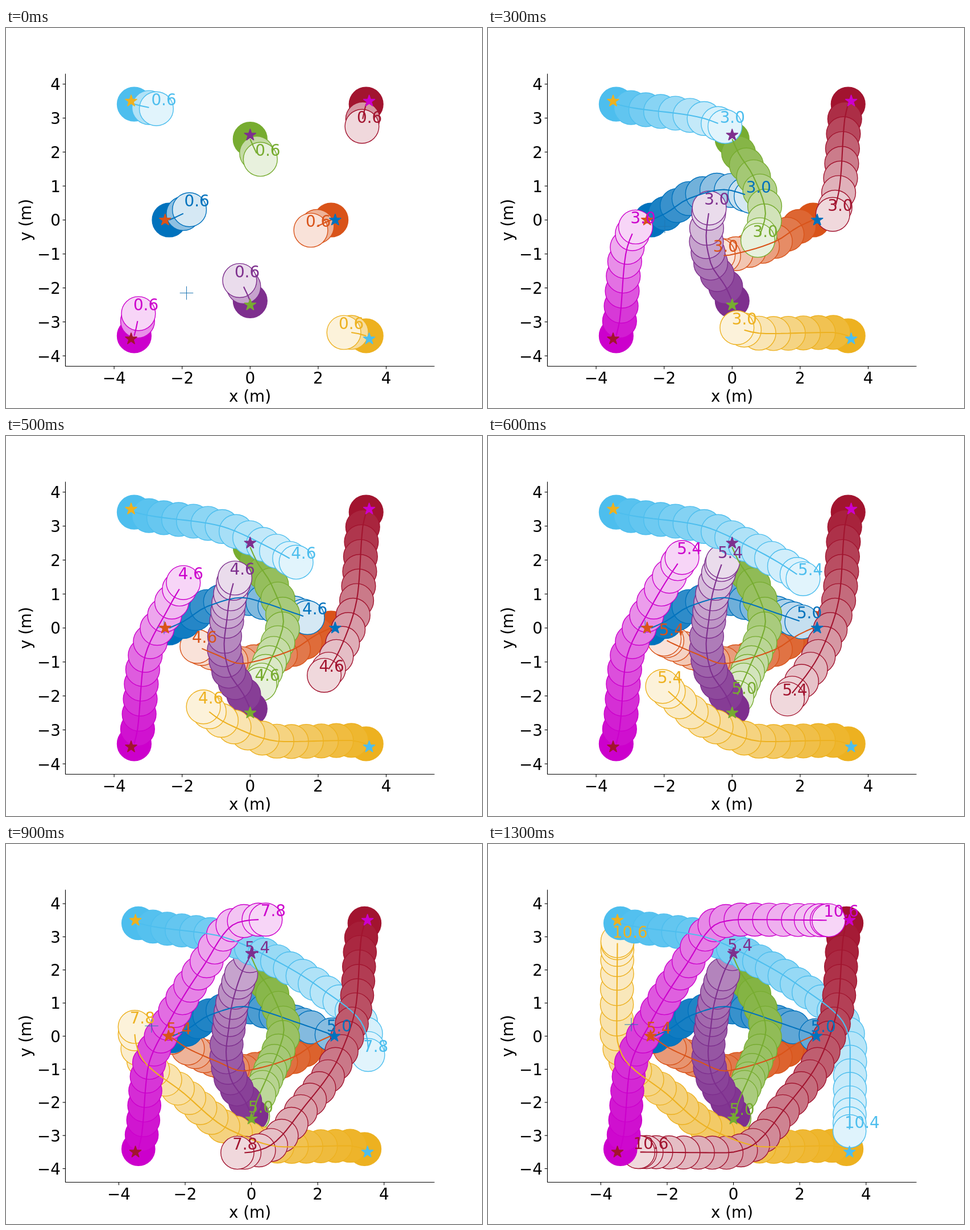
An HTML page with a canvas for the animation above (2300 ms loop, 837 by 669 pixels).

```html
<!DOCTYPE html>
<html>
<head>
<meta charset="utf-8">
<style>
html, body { margin: 0; width: 100%; height: 100%; overflow: hidden; background: #fff; }
canvas { display: block; }
</style>
</head>
<body>
<canvas id="stage" width="837" height="669"></canvas>
<script>
const ctx = document.getElementById('stage').getContext('2d');
const LOOP = 2300, STEP = 100, END = 10.6, RADIUS = 0.5;
const BRAKE = 9.2, REST = 10.05;

// Simulated time that slows evenly as the agents near their goals
function clock(t) {
  const u = Math.max(0, t - BRAKE);
  return t - .28 * u * u;
}

// Monotone cubic curve: flat runs stay flat, without overshoot
function curve(times, values) {
  const last = times.length - 1;
  const slope = i => (values[i + 1] - values[i]) / (times[i + 1] - times[i]);
  const tangent = i => {
    if (i === 0) return slope(0);
    if (i === last) return slope(last - 1);
    const a = slope(i - 1), b = slope(i);
    return a * b > 0 ? 2 * a * b / (a + b) : 0;
  };
  return t => {
    let i = 0;
    while (i < last - 1 && t > times[i + 1]) i++;
    const h = times[i + 1] - times[i];
    const s = Math.min(1, Math.max(0, (t - times[i]) / h)), r = 1 - s;
    return values[i] * (1 + 2 * s) * r * r + values[i + 1] * s * s * (3 - 2 * s)
      + h * s * r * (tangent(i) * r - tangent(i + 1) * s);
  };
}

function path(times, points) {
  const [x, y] = [0, 1].map(axis => curve(times, points.map(p => p[axis])));
  return t => [x(t), y(t)];
}

function turn([x, y], quarters) {
  for (let i = 0; i < quarters; i++) [x, y] = [-y, x];
  return [x, y];
}

// All agents of a ring share start and finish, turned by quarter circles;
// only the middle of the route is their own.
const inner = {
  goal: [2.5, 0],
  times: [0, .4, 1.2, 2.2, 2.8, 3.8, 5.4, 7, REST],
  route: middle => [[-2.38, 0], [-1.965, .19], [-1.27, .63], ...middle, [2.38, .06], [2.48, .03]]
};
const outer = {
  goal: [3.5, -3.5],
  times: [0, .4, 2.2, 3.8, 5.4, 7, 7.6, REST],
  route: middle => [[-3.41, 3.41], [-2.975, 3.31], ...middle, [3.52, middle[3][1] - .63], [3.5, -2.87]]
};

function agent(color, ring, quarters, stop, middle) {
  const route = path(ring.times, ring.route(middle));
  return { color, stop, goal: turn(ring.goal, quarters), at: t => turn(route(clock(t)), quarters) };
}

// Listed from back to front
const agents = [
  agent('#D95319', inner, 2, 5.4, [[-.305, .945], [.25, 1.05], [.99, .785], [2, .325]]),
  agent('#0072BD', inner, 0, 5, [[-.24, .895], [.38, .75], [1.18, .48], [2.05, .18]]),
  agent('#77AC30', inner, 3, 5, [[-.19, .98], [.435, .815], [1.15, .51], [2.04, .135]]),
  agent('#7E2F8E', inner, 1, 5.4, [[-.46, .765], [.2, .69], [.865, .605], [1.96, .275]]),
  agent('#EDB120', outer, 2, 10.6, [[-1, 3.345], [.665, 2.82], [2.045, 1.72], [3.36, .57]]),
  agent('#4DBEEE', outer, 0, 10.4, [[-1.03, 3.04], [.58, 2.36], [2.085, 1.45], [3.39, .27]]),
  agent('#A2142F', outer, 3, 10.6, [[-1.02, 3.165], [.65, 2.63], [2.09, 1.625], [3.38, .42]]),
  agent('#CC00CC', outer, 1, 10.6, [[-1.01, 3.13], [.57, 2.41], [2.075, 1.475], [3.43, .415]])
];

const mark = path([.6, 2.2, 3.8, 5.4, 7, 9.4],
  [[-1.87, -2.15], [-1.49, -.57], [-2.5, 0], [-2.56, .03], [-2.96, .28], [-3.08, .35]]);

let scale, originX, originY;
const px = ([x, y]) => [originX + x * scale, originY - y * scale];

// Blend a hex colour with white
function tint(hex, alpha) {
  const parts = [1, 3, 5].map(i => parseInt(hex.slice(i, i + 2), 16));
  return `rgb(${parts.map(c => Math.round(255 - (255 - c) * alpha))})`;
}

function strokeLine(points, color, width) {
  ctx.strokeStyle = color;
  ctx.lineWidth = width;
  ctx.beginPath();
  points.forEach(p => ctx.lineTo(...p));
  ctx.stroke();
}

function text(str, x, y, align, color = '#000') {
  ctx.fillStyle = color;
  ctx.textAlign = align;
  ctx.fillText(str, x, y);
}

function drawAxes() {
  strokeLine([[104.5, 80.5], [104.5, 595.5], [753.5, 595.5]], '#000', 1.1);
  const name = v => String(v).replace('-', '\u2212');
  for (let v = -4; v <= 4; v++) {
    const [x, y] = px([v, v]);
    strokeLine([[104.5, y], [99.6, y]], '#000', 1.1);
    text(name(v), 96, y + 10.3, 'right');
    if (v % 2 === 0) {
      strokeLine([[x, 595.5], [x, 600.4]], '#000', 1.1);
      text(name(v), x, 626, 'center');
    }
  }
  text('x (m)', 429, 658, 'center');
  ctx.save();
  ctx.translate(44, 338);
  ctx.rotate(-Math.PI / 2);
  text('y (m)', 0, 0, 'center');
  ctx.restore();
}

function drawDiscs(a, now) {
  const disc = (pos, t) => {
    ctx.beginPath();
    ctx.arc(...px(pos), RADIUS * scale, 0, 2 * Math.PI);
    ctx.fillStyle = tint(a.color, 1 - t / (1.2 * now));
    ctx.fill();
    ctx.strokeStyle = a.color;
    ctx.lineWidth = 1.39;
    ctx.stroke();
  };
  const end = Math.min(now, a.stop);
  for (let k = 0; k * .4 < end - .01; k++) disc(a.at(k * .4), k * .4);
  disc(a.at(now), end);
}

function drawTrail(a, now) {
  const steps = Math.round(now / .2);
  strokeLine(Array.from({ length: steps }, (_, i) => px(a.at(i * .2))), a.color, 2.1);
}

function drawStar(a) {
  const [x, y] = px(a.goal);
  ctx.beginPath();
  for (let i = 0; i < 10; i++) {
    const r = i % 2 ? 4.2 : 10.9, angle = i * Math.PI / 5;
    ctx.lineTo(x + r * Math.sin(angle), y - r * Math.cos(angle));
  }
  ctx.closePath();
  ctx.fillStyle = ctx.strokeStyle = a.color;
  ctx.lineWidth = 1.39;
  ctx.lineJoin = 'bevel';
  ctx.fill();
  ctx.stroke();
}

function drawLabel(a, now) {
  const [x, y] = a.at(now);
  const [lx, ly] = px([x - .15, y + .1]);
  text(Math.min(now, a.stop).toFixed(1), lx, ly, 'left', a.color);
}

function drawMark(now) {
  const [x, y] = px(mark(now));
  strokeLine([[x - 11.8, y], [x + 11.8, y]], '#1f77b4', 1);
  strokeLine([[x, y - 11.8], [x, y + 11.8]], '#1f77b4', 1);
}

function draw(now) {
  // The view widens once the agents swing outwards
  const wide = now > 7.1;
  scale = wide ? 58.3 : 59.8;
  originX = wide ? 431.6 : 429.3;
  originY = wide ? 338.3 : 338;
  ctx.fillStyle = '#fff';
  ctx.fillRect(0, 0, 837, 669);
  ctx.font = '27.78px "DejaVu Sans", sans-serif';
  agents.forEach(a => drawDiscs(a, now));
  drawAxes();
  agents.forEach(a => drawTrail(a, now));
  drawMark(now);
  agents.forEach(drawStar);
  agents.forEach(a => drawLabel(a, now));
}

function tick() {
  const step = Math.floor(performance.now() % LOOP / STEP);
  draw(Math.min(END, .6 + .8 * step));
  requestAnimationFrame(tick);
}
tick();
</script>
</body>
</html>
```
